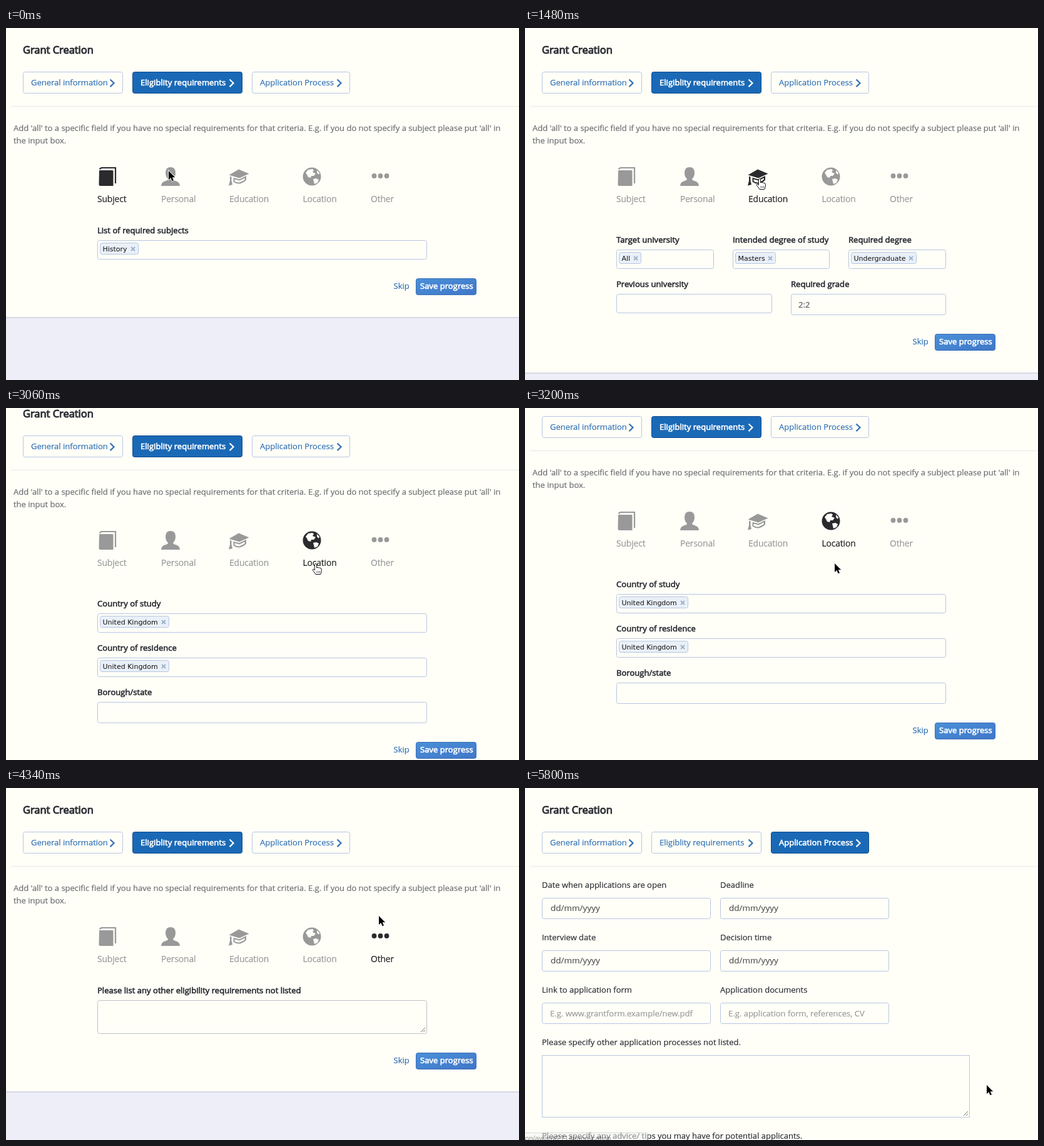
Animation of 820x564 px, one loop 5820 ms. Source, as an HTML page:

```html
<!DOCTYPE html>
<html lang="en">
<head>
<meta charset="utf-8">
<title>Grant Creation</title>
<style>
  html, body { margin: 0; width: 100%; height: 100%; overflow: hidden; background: #eeeef8; }
  svg { display: block; }
  text { font: 13px "Open Sans", "Noto Sans", sans-serif; fill: currentColor; stroke: currentColor; stroke-width: .2px; white-space: pre; }
  .bold { stroke-width: .65px; letter-spacing: .04px; }
  .title { font-size: 16.5px; stroke-width: 1px; letter-spacing: -.03px; }
  .icon { font-size: 13.8px; letter-spacing: -.1px; }
  .date { font-size: 13.5px; }
  .tag { font: 11px "DejaVu Sans", sans-serif; stroke: none; }
  .status { font: 11.5px "Liberation Sans", Arial, sans-serif; stroke: none; }
  .under { text-decoration: underline; }
</style>
</head>
<body>
<svg id="stage" width="820" height="564" viewBox="0 0 820 564">
  <defs>
    <linearGradient id="blue" x2="1" y2="1">
      <stop stop-color="#4a90d8"/><stop offset="1" stop-color="#4076c8"/>
    </linearGradient>
  </defs>
  <g id="page"></g>
  <g id="status">
    <path d="M-2 566V552.5H193.500q3 0 3 3V566z" fill="#f3f3f3" stroke="#b4b4b4"/>
    <text class="status" x="0" y="565" color="#333">on/award/2714#application</text>
  </g>
  <path id="arrow" d="M0 0V14L3.300 11 5.600 16.300 8 15.300 5.700 10.200H10.200Z" stroke="#fff" stroke-width="1.600" paint-order="stroke"/>
  <g id="hand" stroke="#111" stroke-linejoin="round">
    <path d="M-1.600 1.500q1.600-2.500 3.200 0V7q1.300-1.500 2.700 0 1.400-1 2.600.6 2-.6 2.400 1.600V12q0 2-1.500 5.500H0Q-2 14-5 10.500q.5-2.300 3.400 0Z" fill="#fff"/>
    <path d="M2 12.500v2.500M4.300 12.500v2.500M6.500 12.500v2.500" stroke-width=".8"/>
  </g>
</svg>
<script>
const LOOP = 5820;
const INK = '#2b2d33', GREY = '#999', LINK = '#3070b5', EDGE = '#b9c6e2', CREAM = '#fffff8';
const $ = id => document.getElementById(id);

// Panels in order of appearance; the lower edge also places the buttons
const LOCATION = 3, PROCESS = 5;
const bottoms = [463, 555, 552, 623, 486, 900];
const starts = [0, 700, 1340, 2740, 4320, 5260];

// Cursor stops: time, x, y
const path = [
  [0, 260, 229], [250, 262, 236], [800, 262, 236], [1220, 375, 241], [1880, 375, 241],
  [2480, 495, 249], [3220, 495, 249], [3600, 596, 205], [4400, 596, 205],
  [4860, 690, 434], [5300, 690, 434], [5680, 738, 476], [LOOP, 738, 476]
];

// Name, left, width, drawing
const icons = [
  ['Subject', 146, 48, c => `<path d="M149 228h21q1.500 0 1.500 1.500V253H151q-2.500 0-2.500-2.500z" fill="${c}"/>
    <path d="M149.500 226l3-2H175V249" fill="none" stroke="${c}" stroke-width="2.200"/>`],
  ['Personal', 248, 54, c => `<path d="M248 253q0-6 7-8 4-1 4-3-4-4-4-10 0-9 8-9t8 9q0 6-4 10 0 2 4 3 7 2 7 8z" fill="${c}"/>`],
  ['Education', 357, 63, c => `<path d="M356.500 235.500L372 226.500 388.500 233.500 373 240.500zM358 237.500l2.500 1v6.500l1.500 6-6 1.500 2-7.500z" fill="${c}"/>
    <path d="M364.500 241v5q4 3 9 2.500 6-1.500 9.500-5.500v-4.500l-10 5z" fill="none" stroke="${c}" stroke-width="2"/>`],
  ['Location', 474.5, 54, c => `<circle cx="489" cy="238" r="14.500" fill="${c}"/>
    <path d="M479 232l4-5 7-1 2 2-2 3 5 2-3 4-4 0-1 3-4-1-2-4zM491 242l5-1 4 2-2 5-5 2zM497 228l4 4-1 3-3-3z" fill="${CREAM}"/>`],
  ['Other', 583, 36, c => [588.5, 598.5, 608.5].map(x => `<circle cx="${x}" cy="237" r="3.900" fill="${c}"/>`).join('')]
];

const text = (x, y, s, color = INK, cls = '') => `<text x="${x}" y="${y}" color="${color}" class="${cls}">${s}</text>`;
const label = (x, y, s) => text(x, y, s, INK, 'bold');
const box = (x1, y1, x2, y2, fill = CREAM, edge = EDGE) =>
  `<rect x="${x1 + .5}" y="${y1 + .5}" width="${x2 - x1 - 1}" height="${y2 - y1 - 1}" rx="3" fill="${fill}" stroke="${edge}"/>`;
const grip = (x, y) => `<path d="M${x - 9} ${y - 2}l7-7M${x - 5} ${y - 2}l3-3" stroke="#777"/>`;

function tag(x, y, w, s) {
  const cx = x + w - 9, cy = y + 10;
  return box(x, y, x + w, y + 19, '#eaf0f8', '#b6c7e0') + text(x + 4.5, y + 14, s, '#111', 'tag') +
    `<path d="M${cx - 3} ${cy - 3}l6 6m0-6l-6 6" stroke="#98b0cc" stroke-width="1.800"/>`;
}

// A labelled input with an optional tag
const field = (x1, x2, y, name, s, w, h = 31) =>
  label(x1, y - 11, name) + box(x1, y, x2, y + h) + (s ? tag(x1 + 4, y + 4, w, s) : '');

const panels = [
  field(146, 673, 340, 'List of required subjects', 'History', 62),
  field(146, 302, 355, 'Gender', '', 0, 34) + field(332, 487, 355, 'Age', '', 0, 34) +
    field(517, 673, 355, 'Nationality', '', 0, 34) +
    field(146, 395, 429, 'Ethnicity', '', 0, 34) + field(425, 673, 429, 'Religion', '', 0, 34),
  field(146, 302, 355, 'Target university', 'All', 36) +
    field(332, 487, 355, 'Intended degree of study', 'Masters', 65) +
    field(517, 673, 355, 'Required degree', 'Undergraduate', 105) +
    field(146, 395, 426, 'Previous university') +
    field(425, 673, 426, 'Required grade', '', 0, 34) + text(437, 448, '2:2', '#555'),
  field(146, 673, 355, 'Country of study', 'United Kingdom', 111) +
    field(146, 673, 426, 'Country of residence', 'United Kingdom', 111) +
    field(146, 673, 497, 'Borough/state', '', 0, 34),
  label(146, 329, 'Please list any other eligibility requirements not listed') +
    box(146, 340, 673, 394, CREAM, '#bfc1c6') + grip(672, 393),
  processPanel()
];

function processPanel() {
  const names = ['Date when applications are open', 'Deadline', 'Interview date', 'Decision time',
    'Link to application form', 'Application documents'];
  const hints = ['E.g. www.grantform.example/new.pdf', 'E.g. application form, references, CV'];
  const cells = names.map((name, i) => {
    const x = 27 + i % 2 * 285, y = 176 + (i >> 1) * 84;
    return text(x, y - 16, name) + box(x, y, x + 270, y + 34) +
      (i < 4 ? text(x + 14, y + 21, 'dd/mm/yyyy', '#555', 'date') : text(x + 13, y + 22, hints[i - 4], GREY));
  });
  return cells.join('') +
    text(27, 412, 'Please specify other application processes not listed.') +
    `<rect x="27.500" y="428.500" width="683" height="99" fill="${CREAM}" stroke="${EDGE}"/>` + grip(710, 527) +
    text(27, 562, 'Please specify any advice/ tips you may have for potential applicants.');
}

function step(x1, x2, s, active) {
  const color = active ? '#fff' : LINK;
  return box(x1, 70, x2, 105, active ? '#1a69b6' : CREAM, active ? '#0f4a8c' : EDGE) +
    text(x1 + 13, 92, s, color, active ? 'bold' : '') +
    `<path d="M${x2 - 20.5} 82.500l6 5.800-6 5.800" fill="none" stroke="${color}" stroke-width="2.200"/>`;
}

function buttons(y, hover) {
  return text(619.5, y + 17, 'Skip', LINK) + box(655, y, 752, y + 27, 'url(#blue)', '#3a6fb8') +
    text(662, y + 17, 'Save progress', hover ? '#2a66ad' : '#fff', hover ? 'under' : 'bold');
}

function drawPage(panel, hoverIcon, hoverSave) {
  const end = bottoms[panel];
  let out = `<rect y="-2" width="820" height="${end + 2}" fill="${CREAM}"/>
    <rect y="${end}" width="820" height="2" fill="#d8d8e6"/>
    <rect x="8" y="125" width="812" height="1" fill="#e9e9e4"/>` +
    text(27, 41, 'Grant Creation', INK, 'bold title') +
    step(27, 187, 'General information') +
    step(202, 378, 'Eligiblity requirements', panel < PROCESS) +
    step(393, 550, 'Application Process', panel === PROCESS);
  if (panel < PROCESS) {
    out += text(12, 165, "Add 'all' to a specific field if you have no special requirements for that criteria. E.g. if you do not specify a subject please put 'all' in", '#6b6c70') +
      text(12, 185, 'the input box.', '#6b6c70') + buttons(end - 62, hoverSave);
    icons.forEach(([name, x, , draw], i) => {
      const on = i === panel || i === hoverIcon;
      out += draw(on ? '#2b2b2e' : GREY) + text(x, 279, name, on ? '#222' : GREY, 'icon');
    });
  }
  return out + panels[panel];
}

const clamp = v => Math.max(0, Math.min(1, v));

function cursorAt(t) {
  const i = path.findIndex(p => p[0] > t), [t0, x0, y0] = path[i - 1], [t1, x1, y1] = path[i];
  const u = (t - t0) / (t1 - t0), k = u * u * (3 - 2 * u);
  return [x0 + (x1 - x0) * k, y0 + (y1 - y0) * k];
}

let shown = '';
function frame() {
  const t = performance.now() % LOOP;
  const panel = starts.findLastIndex(s => s <= t);
  const scroll = panel === LOCATION ? Math.round(65 * clamp((t - 2940) / 300)) : 0;
  const [x, y] = cursorAt(t), py = y + scroll;

  const live = t > 40 && panel < PROCESS;
  const hoverIcon = live && py > 221 && py < 286 ? icons.findIndex(([, left, w]) => x >= left && x <= left + w) : -1;
  const saveY = bottoms[panel] - 62;
  const hoverSave = live && x > 655 && x < 752 && py > saveY && py < saveY + 27;
  const hand = hoverIcon >= 0 || hoverSave;

  const key = [panel, hoverIcon, hoverSave].join();
  if (key !== shown) {
    $('page').innerHTML = drawPage(panel, hoverIcon, hoverSave);
    shown = key;
  }
  $('page').setAttribute('transform', `translate(0 ${-scroll})`);
  $('status').setAttribute('opacity', hoverSave || panel === PROCESS ? 1 - clamp((t - 5700) / 200) : 0);
  for (const id of ['arrow', 'hand']) {
    $(id).setAttribute('transform', `translate(${x} ${y})`);
    $(id).style.display = (id === 'hand') === hand ? '' : 'none';
  }
  requestAnimationFrame(frame);
}
frame();
</script>
</body>
</html>
```
